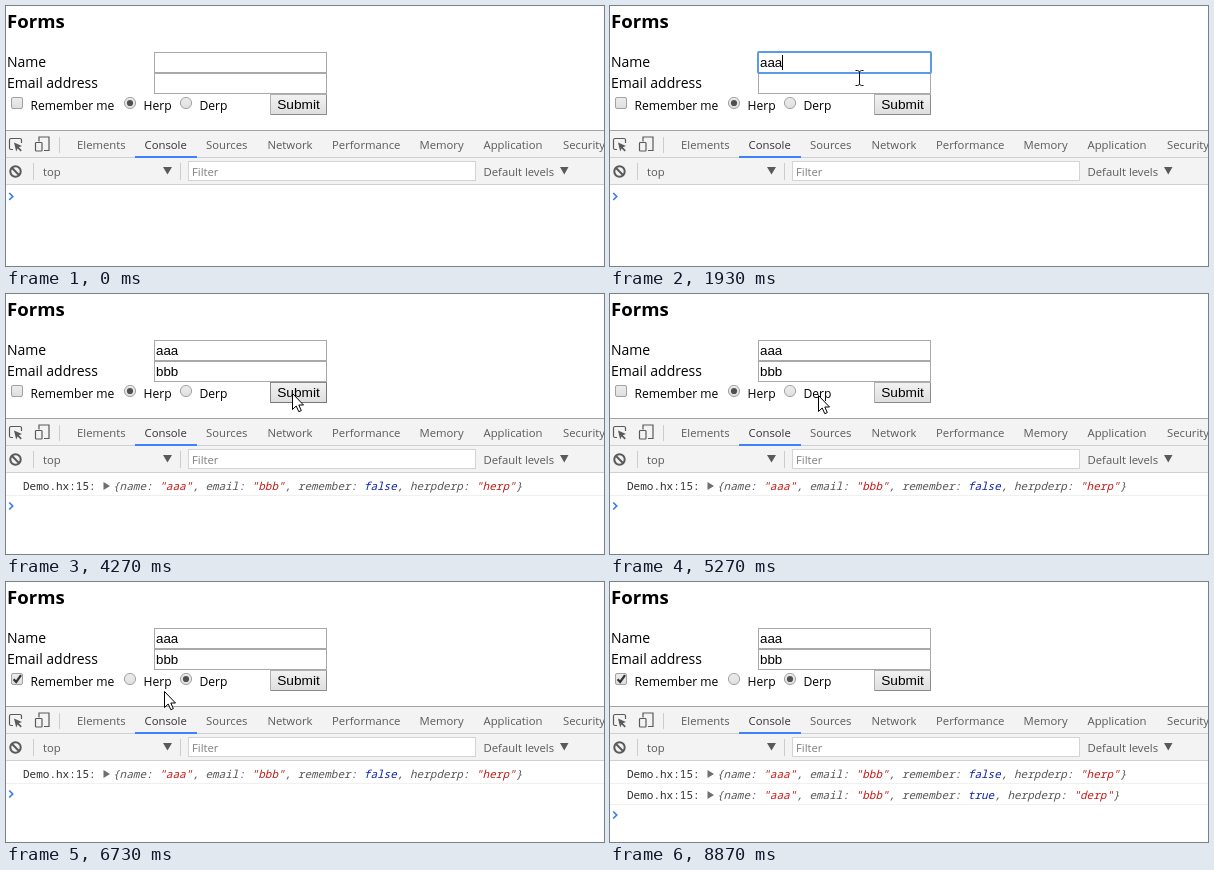
An HTML page that plays this animation: 598x260 px, repeating every 9.87 s.

```html
<!DOCTYPE html>
<html lang="en">
<head>
<meta charset="utf-8">
<title>Forms</title>
<style>
html, body { margin: 0; width: 100%; height: 100%; overflow: hidden; background: #fff; }
svg { display: block; }
text { white-space: pre; }
.page { font: 14px "Open Sans", "Noto Sans", sans-serif; fill: #000; }
.small { font-size: 12.1px; }
.field { font: 13.333px "Liberation Sans", Arial, sans-serif; fill: #000; }
.tool { font: 11.3px "Open Sans", "Noto Sans", sans-serif; fill: #5a5a5a; }
.log { font: 11px "Noto Sans Mono", "DejaVu Sans Mono", monospace; fill: #303030; }
.obj { font-style: italic; fill: #565656; }
.str { fill: #c41a16; }
.bool { fill: #0d22aa; }
.crisp { shape-rendering: crispEdges; }
</style>
</head>
<body>
<svg id="stage" width="598" height="260" viewBox="0 0 598 260">
  <defs>
    <linearGradient id="face" x2="0" y2="1">
      <stop offset="0" stop-color="#f2f2f2"/><stop offset="1" stop-color="#dedede"/>
    </linearGradient>
    <linearGradient id="knob" x2="0" y2="1">
      <stop offset="0" stop-color="#ededed"/><stop offset="1" stop-color="#dedede"/>
    </linearGradient>
  </defs>
  <rect width="598" height="260" fill="#fff"/>

  <g class="page">
    <text x="1" y="22" style="font-size:18.6px;font-weight:700">Forms</text>
    <text x="1" y="61">Name</text>
    <text x="1" y="82">Email address</text>
    <g class="small">
      <text x="24.5" y="104">Remember me</text>
      <text x="137.5" y="104">Herp</text>
      <text x="193.5" y="104">Derp</text>
    </g>
  </g>
  <g fill="#fff" stroke="#a9a9a9" class="crisp">
    <rect x="148.5" y="46.5" width="172" height="20"/>
    <rect x="148.5" y="67.5" width="172" height="20"/>
  </g>
  <rect id="ring" x="148" y="46" width="173" height="21" rx="1" fill="none" stroke="#5c9ae8" stroke-width="2"/>
  <text id="name" class="field" x="150" y="61"></text>
  <text id="email" class="field" x="150" y="82"></text>
  <rect id="caret" width="1" height="15" class="crisp"/>

  <g fill="url(#knob)" stroke="#a2a2a2">
    <rect x="5.5" y="91.5" width="11" height="11" rx="1.5"/>
    <circle cx="124" cy="97" r="5.6"/>
    <circle cx="180" cy="97" r="5.6"/>
  </g>
  <path id="check" d="M7.6 97.2l2.6 2.8l4.8-6.8" fill="none" stroke="#333" stroke-width="2.2"/>
  <circle id="dot" cy="97" r="3.1" fill="#505050"/>

  <rect id="button" x="264.5" y="88.5" width="56" height="20" class="crisp"/>
  <path id="shade" d="M265 108.5h56M320.5 89v20" class="crisp"/>
  <text class="field" x="292.5" y="103" text-anchor="middle" style="font-size:13.7px">Submit</text>

  <g class="crisp">
    <rect y="124" width="598" height="55" fill="#f3f3f3"/>
    <path d="M0 124.5h598" stroke="#a3a3a3"/>
    <path d="M0 151.5h598M0 178.5h598" stroke="#d0d0d0"/>
    <path d="M53.5 131v16M27.5 157v17M174.5 157v17" stroke="#ccc"/>
    <rect x="129" y="150" width="62" height="2" fill="#3e82f7"/>
    <rect x="182.5" y="155.5" width="287" height="19" fill="#fff" stroke="#d4d4d4"/>
  </g>
  <g fill="none" stroke="#5a5a5a" stroke-width="1.2">
    <path d="M7 143.5H5a1.5 1.5 0 0 1-1.5-1.5v-8a1.5 1.5 0 0 1 1.5-1.5h9a1.5 1.5 0 0 1 1.5 1.5v3"/>
    <path d="M8 136.5l8 3.5l-3.2 1.2l3 3l-1.2 1.2l-3-3l-1.4 3z" fill="#5a5a5a" stroke="none"/>
    <path d="M33 135.5v-4.500h10v13.5h-5"/>
    <rect x="29.5" y="136.5" width="6.500" height="8.500" rx=".8"/>
    <circle cx="9.5" cy="165.5" r="5.2" stroke-width="2"/>
    <path d="M5.800 161.8l7.400 7.400" stroke-width="2"/>
  </g>
  <path d="M157 161h9l-4.500 7.500zM554 161h8.500l-4.250 7.500z" fill="#5a5a5a"/>
  <g class="tool" id="tabs">
    <text x="37" y="170">top</text>
    <text x="186" y="170" style="fill:#808080">Filter</text>
    <text x="477.5" y="170">Default levels</text>
  </g>

  <g id="rows"></g>
  <path id="prompt" d="M3.2 -3.5L6.7 0L3.2 3.5" fill="none" stroke="#367cf1" stroke-width="1.7"/>

  <g id="pointer">
    <path id="arrow" d="M.5 .5V16.5L4.200 13L6.800 18.7L9.300 17.6L6.800 12H11.500Z" fill="#fff" stroke="#000"/>
    <path id="beam" d="M-3.5 -7.5H-1.5L.5 -6.5L2.5 -7.5H4.500M.5 -6.500V6.500M-3.500 7.500H-1.500L.5 6.500L2.500 7.500H4.500" fill="none" stroke="#111"/>
  </g>
</svg>
<script>
const LOOP = 9870, STEP = 1000 / 15;
const $ = id => document.getElementById(id);
const set = (id, attrs) => { for (const a in attrs) $(id).setAttribute(a, attrs[a]); };
const show = (id, on) => set(id, { visibility: on ? "visible" : "hidden" });

// Pointer path: [step, x, y]
const path = [
  [1, 549, 246], [4, 478, 196], [8, 330, 104], [12, 253, 59], [28, 253, 59],
  [29, 249, 72], [31, 239, 79], [43, 239, 79], [44, 240, 79], [52, 240, 79],
  [53, 244, 82], [55, 265, 97], [59, 286, 99], [74, 286, 99],
  [75, 279, 99], [78, 222, 102], [81, 180, 100], [83, 180, 100],
  [86, 124, 111], [89, 76, 106], [90, 73, 105], [93, 11, 98], [96, 11, 98],
  [99, 80, 108], [103, 235, 109], [107, 300, 105], [119, 300, 105],
  [120, 300, 107], [128, 300, 107], [132, 36, 252], [133, 36, 252]
];
const inputs = [[148, 46, 321, 88], [182, 155, 469, 175]];
const inside = (p, [l, t, r, b]) => p.x >= l && p.x < r && p.y >= t && p.y < b;

function pointerAt(k) {
  const i = path.findIndex(p => p[0] > k);
  if (i < 1) return null;
  const [k0, x0, y0] = path[i - 1], [k1, x1, y1] = path[i];
  const u = (k - k0) / (k1 - k0);
  return { x: Math.round(x0 + (x1 - x0) * u), y: Math.round(y0 + (y1 - y0) * u) };
}

const tabs = [["Elements", 71], ["Console", 138.5], ["Sources", 200], ["Network", 261.5],
  ["Performance", 326], ["Memory", 413.5], ["Application", 477.5], ["Security", 557]];
$("tabs").innerHTML += tabs.map(([s, x]) =>
  `<text x="${x}" y="143"${s === "Console" ? ' style="fill:#333"' : ""}>${s}</text>`).join("");

const str = s => `<tspan class="str">"${s}"</tspan>`;
const row = (i, remember, herp) => `<g id="row${i}" transform="translate(0 ${21 * i})">
  <path d="M0 201.5h598" stroke="#f0f0f0" class="crisp"/>
  <path d="M97.5 188v8l6.5-4z" fill="#6e6e6e"/>
  <text class="log" x="17" y="196">Demo.hx:15:</text>
  <text class="log obj" x="107" y="196">{name: ${str("aaa")}, email: ${str("bbb")}, remember: <tspan class="bool">${remember}</tspan>, herpderp: ${str(herp)}}</text></g>`;
$("rows").innerHTML = row(0, false, "herp") + row(1, true, "derp");

const nameKeys = [19, 24, 26], emailKeys = [37, 40, 42];
const typed = (keys, k) => keys.filter(s => s <= k).length;

function draw(ms) {
  const k = Math.floor((ms + 4) / STEP);
  const nName = typed(nameKeys, k), nEmail = typed(emailKeys, k);
  $("name").textContent = "a".repeat(nName);
  $("email").textContent = "b".repeat(nEmail);

  const onEmail = k >= 33, focus = k >= 13 && k < 62;
  const edits = onEmail ? [33, ...emailKeys] : [13, ...nameKeys];
  const last = Math.max(...edits.filter(s => s <= k));
  const n = onEmail ? nEmail : nName;
  set("ring", { y: onEmail ? 67 : 46 });
  show("ring", focus);
  set("caret", { x: Math.floor(150 + n * 7.415), y: onEmail ? 70 : 49 });
  show("caret", focus && Math.floor((k - last) / 8) % 2 === 0);

  show("check", k >= 94);
  set("dot", { cx: k >= 82 ? 180 : 124 });

  const p = pointerAt(k);
  const hover = p && inside(p, [264, 88, 321, 109]);
  const pressed = (k >= 62 && k < 64) || k === 109;
  set("button", { fill: pressed ? "#d6d6d6" : "url(#face)", stroke: hover ? "#8a8a8a" : "#b0b0b0" });
  set("shade", { stroke: hover ? "#767676" : "#8b8b8b" });

  const lines = (k >= 64) + (k >= 110);
  show("row0", lines > 0);
  show("row1", lines > 1);
  set("prompt", { transform: `translate(0 ${[190.5, 212, 233][lines]})` });

  const typing = p && inputs.some(r => inside(p, r));
  show("arrow", p && !typing);
  show("beam", typing);
  if (p) set("pointer", { transform: `translate(${p.x} ${p.y})` });
}

const start = performance.now();
function tick() {
  draw((performance.now() - start) % LOOP);
  requestAnimationFrame(tick);
}
draw(0);
requestAnimationFrame(tick);
</script>
</body>
</html>
```
